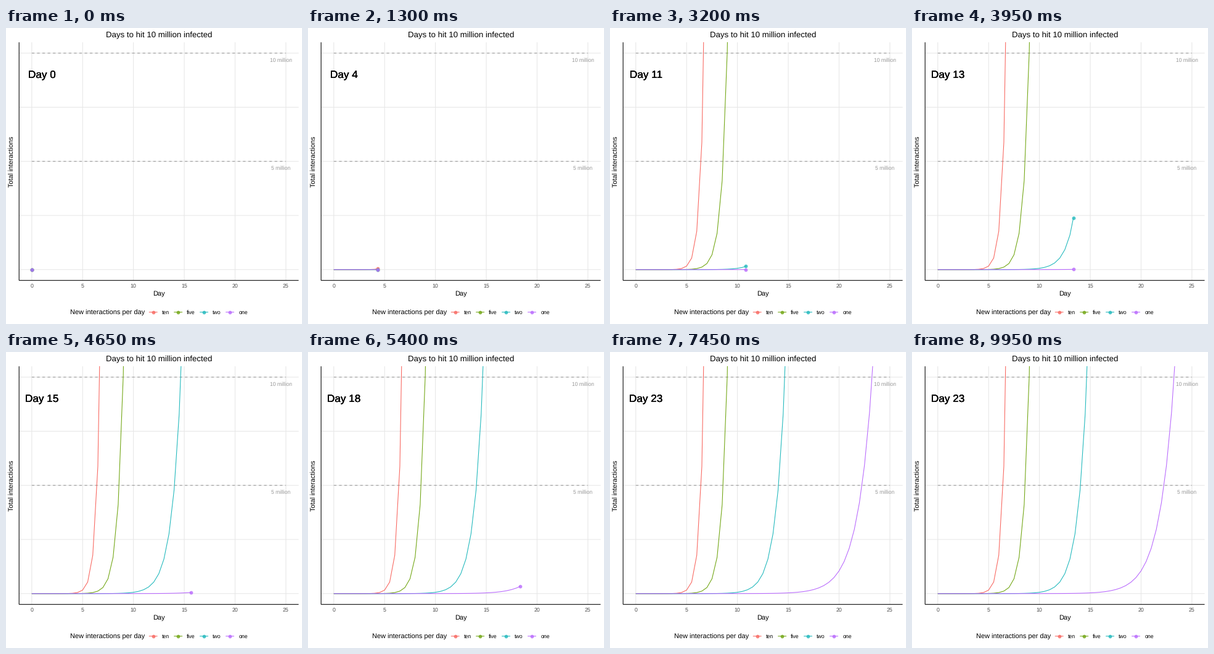
Recreate the animation shown at these times as a matplotlib script. Size 480x480 px, loop 10000 ms.

```python
import numpy as np
import matplotlib
import matplotlib.pyplot as plt
from matplotlib.animation import FuncAnimation
from matplotlib.patches import Rectangle

matplotlib.rcParams["font.family"] = "Liberation Sans"
matplotlib.rcParams["text.hinting"] = "none"
matplotlib.rcParams["toolbar"] = "None"

SIZE = 480
FRAMES, INTERVAL = 200, 50
REVEAL = 139              # last step before the closing pause
LEFT, RIGHT, TOP, BOTTOM = 21.2, 474.5, 23.2, 409.3
STROKE = 1.07
GROUPS = [
    ("ten", 10, "#f8665f"),
    ("five", 5, "#70a511"),
    ("two", 2, "#1fb8bc"),
    ("one", 1, "#b868fd"),
]

# Half-day rows, each landing on a whole step of the reveal.
rows = np.arange(48)
marks = np.round(rows * REVEAL / rows[-1])


def px(day):
    pad = (RIGHT - LEFT) * 0.05 / 1.1
    return LEFT + pad + day / 25 * (RIGHT - LEFT - 2 * pad)


def py(count):
    pad = (BOTTOM - TOP) * 0.05 / 1.1
    return BOTTOM - pad - count / 1e7 * (BOTTOM - TOP - 2 * pad)


fig = plt.figure(figsize=(SIZE / 72, SIZE / 72), dpi=72, facecolor="white")
ax = fig.add_axes([0, 0, 1, 1])
ax.set_xlim(0, SIZE)
ax.set_ylim(SIZE, 0)
ax.axis("off")
panel = Rectangle((LEFT, TOP), RIGHT - LEFT, BOTTOM - TOP, transform=ax.transData)


def stroke(xs, ys, color, z, **kw):
    line, = ax.plot(xs, ys, color=color, lw=STROKE, zorder=z, snap=False,
                    solid_capstyle="butt", **kw)
    return line


def dot(x, y, color, z):
    mark, = ax.plot([x], [y], "o", color=color, ms=5.8, mew=0, alpha=0.8,
                    zorder=z, snap=False)
    return mark


def label(x, y, text, size, color="black", ha="center", **kw):
    return ax.text(x, y, text, fontsize=size, color=color, ha=ha,
                   va="baseline", zorder=8, **kw)


# Grid, axes and thresholds
for count in np.arange(0, 1.01e7, 2.5e6):
    stroke([LEFT, RIGHT], [py(count)] * 2, "#e7e7e7", 1)
for day in range(0, 26, 5):
    stroke([px(day)] * 2, [TOP, BOTTOM], "#e7e7e7", 1)
    label(px(day), 421.2, str(day), 8.8, "#4d4d4d")
stroke([LEFT, RIGHT], [BOTTOM] * 2, "black", 7)
stroke([LEFT] * 2, [TOP, BOTTOM], "black", 7)
for millions, base in ((10, 55), (5, 230.4)):
    y = py(millions * 1e6)
    stroke([px(0), px(25)], [y, y], "#999999", 2, linestyle=(0, (4, 4)))
    label(px(24.5), base, f"{millions} million", 8.54, "#999999")

# Titles
middle = (LEFT + RIGHT) / 2
label(middle, 15, "Days to hit 10 million infected", 13.2)
label(middle, 434, "Day", 11)
label(13.3, (TOP + BOTTOM) / 2, "Total interactions", 11, rotation=90).set_va("center")
ax.texts[-1].set(x=9.6)

# Legend
label(103.5, 465, "New interactions per day", 11, ha="left")
for (name, _, color), x in zip(GROUPS, (238.7, 279.2, 321.1, 363.1)):
    stroke([x - 6.9, x + 6.9], [460.8] * 2, color, 3)
    dot(x, 460.8, color, 4)
    label(x + 14.1, 464, name, 8.8, ha="left")

# Moving parts
curves = []
for i, (_, rate, color) in enumerate(GROUPS):
    totals = np.minimum((1.0 + rate) ** (rows / 2), 4e7)
    line = stroke([], [], color, 3 + i / 10)
    tip = dot(px(0), py(1), color, 4 + i / 10)
    for part in (line, tip):
        part.set_clip_path(panel)
    curves.append((totals, line, tip))

# One counter per group, stacked, which thickens the edges
counters = [label(px(1), 81.9, "Day 0", 17.07) for _ in GROUPS]


def update(frame):
    pos = np.interp(frame, marks, rows)
    shown = rows[rows < pos]
    steps = np.append(shown, pos)
    for totals, line, tip in curves:
        xs, ys = px(steps / 2), py(np.interp(steps, rows, totals))
        line.set_data(xs, ys)
        tip.set_data(xs[-1:], ys[-1:])
    nearest = int(pos + 0.5)
    for counter in counters:
        counter.set_text(f"Day {nearest // 2}")
    return []


anim = FuncAnimation(fig, update, frames=FRAMES, interval=INTERVAL,
                     init_func=lambda: update(0), repeat=True,
                     repeat_delay=0, blit=False)
plt.show()
```
